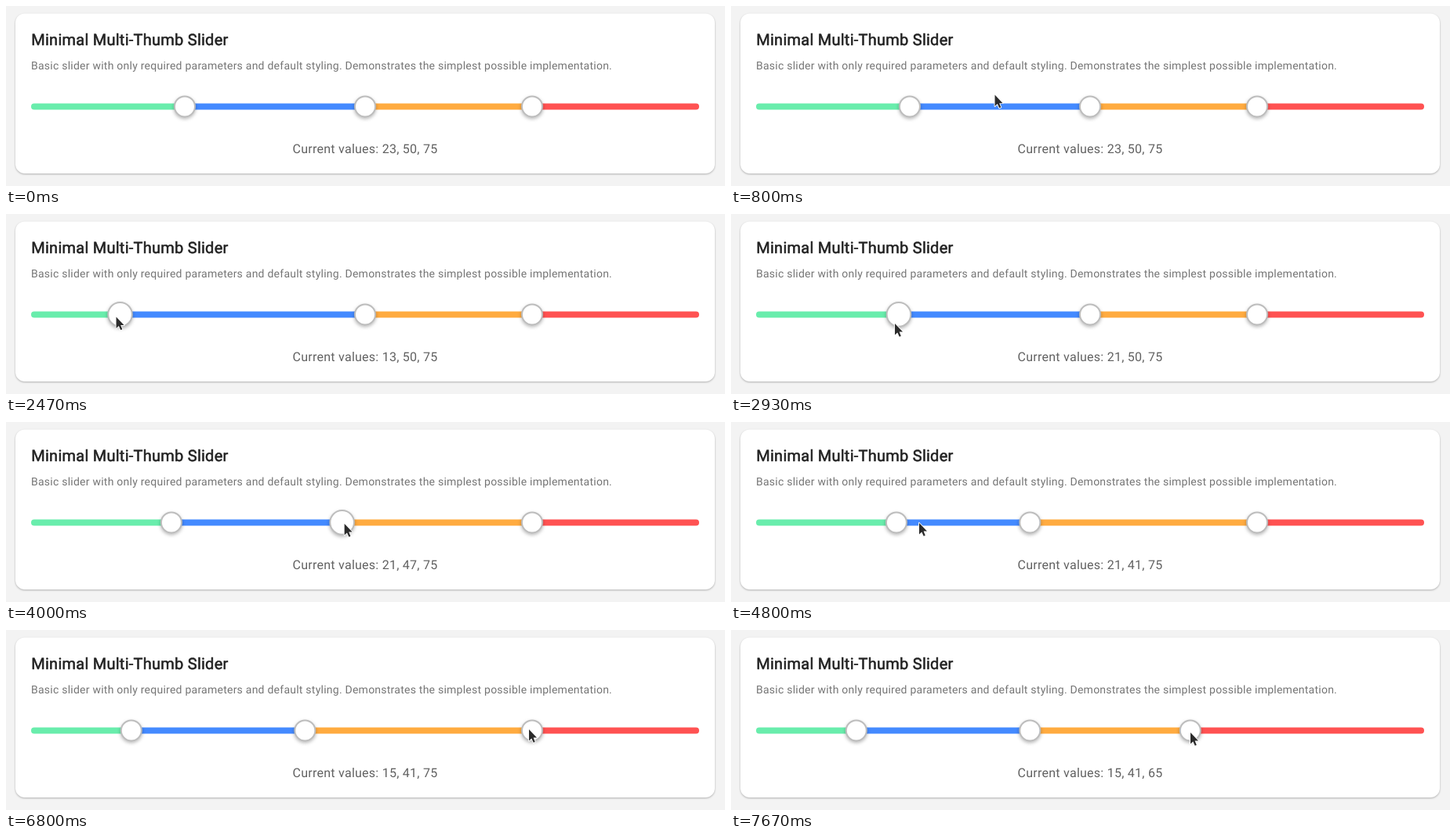
An HTML page for the animation above (8 s loop, 917 by 230 pixels).

```html
<!DOCTYPE html>
<html lang="en">
<head>
<meta charset="utf-8">
<title>Multi-thumb slider</title>
<style>
  html, body { margin: 0; height: 100%; overflow: hidden; background: #f3f3f3; }
  svg { display: block; width: 917px; height: 230px; }
  text { font-family: Roboto, sans-serif; letter-spacing: .25px; text-rendering: geometricPrecision; }
  .card { fill: #fff; filter: drop-shadow(0 1px 1.2px rgba(0, 0, 0, .28)); }
  .title { font-size: 20px; fill: #212121; stroke: #212121; stroke-width: .55px; }
  .note { font-size: 14px; fill: #757575; letter-spacing: .24px; }
  .values { font-size: 16px; fill: #616161; }
  .thumb { fill: #fff; stroke: #bdbdbd; stroke-width: 2; filter: drop-shadow(0 2px 2px rgba(0, 0, 0, .28)); }
  .cursor { fill: #2b2b2b; stroke: #fff; stroke-width: 1.8; stroke-linejoin: round; paint-order: stroke; }
</style>
</head>
<body>
<svg viewBox="0 0 917 230">
  <clipPath id="track"><rect x="32" y="124.4" width="852" height="8" rx="4"/></clipPath>
  <rect class="card" x="12" y="9.5" width="892" height="204.5" rx="12"/>
  <text class="title" x="32.3" y="49.8">Minimal Multi-Thumb Slider</text>
  <text class="note" x="32" y="81">Basic slider with only required parameters and default styling. Demonstrates the simplest possible implementation.</text>
  <g id="bars" clip-path="url(#track)"></g>
  <g id="thumbs"></g>
  <text class="values" id="values" x="365.6" y="188"></text>
  <path class="cursor" id="cursor" d="M0 0V14.5L3.3 11.5L5.7 16.8L7.8 15.9L5.6 10.6H10Z"/>
</svg>
<script>
const TICKS = 120, TICK_MS = 8000 / TICKS;
const LEFT = 32, RIGHT = 884, PER_CENT = (RIGHT - LEFT) / 100;
const COLORS = ['#69edac', '#448aff', '#ffab40', '#ff5252'];
const START_VALUES = [23, 50, 75];

// Ticks are inclusive; a drag carries the cursor along with its thumb.
const point = (start, end, x, y = 130) => ({ start, end, x, y });
const drag = (start, end, thumb, value, y = 130) => ({ start, end, thumb, value, y });

const moves = [
  point(7, 13, 250, 101), point(14, 16, 223),
  drag(20, 29, 0, 12), drag(37, 44, 0, 21.36, 140),
  point(47, 50, 490, 141), point(54, 57, 461),
  drag(60, 62, 1, 40.6),
  point(65, 72, 240, 129), point(75, 76, 217),
  drag(80, 81, 0, 15),
  point(85, 90, 577, 131), point(91, 101, 667, 127),
  drag(104, 110, 2, 67.6), drag(111, 112, 2, 65.4),
  point(115, 115, 586, 131)
];

const ease = p => p * (1.15 - .15 * p);

function stateAt(tick) {
  const values = [...START_VALUES];
  let x = 945, y = 202, held;
  for (const move of moves) {
    if (tick < move.start) break;
    // A released thumb snaps to a whole value.
    if (held !== undefined && move.thumb !== held) values[held] = Math.round(values[held]);
    held = move.thumb;
    const p = ease(Math.min(1, (tick - move.start + 1) / (move.end - move.start + 1)));
    if (held === undefined) {
      x += (move.x - x) * p;
    } else {
      const change = (move.value - values[held]) * p;
      values[held] += change;
      x += change * PER_CENT;
    }
    y += (move.y - y) * p;
  }
  return { values, x, y, held };
}

const byId = id => document.getElementById(id);

function setAll(node, attrs) {
  for (const name in attrs) node.setAttribute(name, attrs[name]);
  return node;
}

function add(parent, tag, attrs) {
  const node = document.createElementNS('http://www.w3.org/2000/svg', tag);
  return parent.appendChild(setAll(node, attrs));
}

const bars = COLORS.map(fill => add(byId('bars'), 'rect', { y: 124, height: 9, fill }));
const thumbs = START_VALUES.map(() => add(byId('thumbs'), 'circle', { class: 'thumb', cy: 128.4 }));

function draw(tick) {
  const { values, x, y, held } = stateAt(tick);
  const stops = [0, ...values, 100].map(value => LEFT + value * PER_CENT);
  bars.forEach((bar, i) => setAll(bar, { x: stops[i], width: stops[i + 1] - stops[i] }));
  thumbs.forEach((thumb, i) => setAll(thumb, { cx: stops[i + 1], r: i === held ? 15.3 : 13 }));
  byId('values').textContent = 'Current values: ' + values.map(Math.round).join(', ');
  setAll(byId('cursor'), {
    visibility: tick < moves[0].start ? 'hidden' : 'visible',
    transform: `translate(${x} ${y})`
  });
}

const start = performance.now();
function loop() {
  draw(Math.floor((performance.now() - start + 5) / TICK_MS) % TICKS);
  requestAnimationFrame(loop);
}
loop();
</script>
</body>
</html>
```
